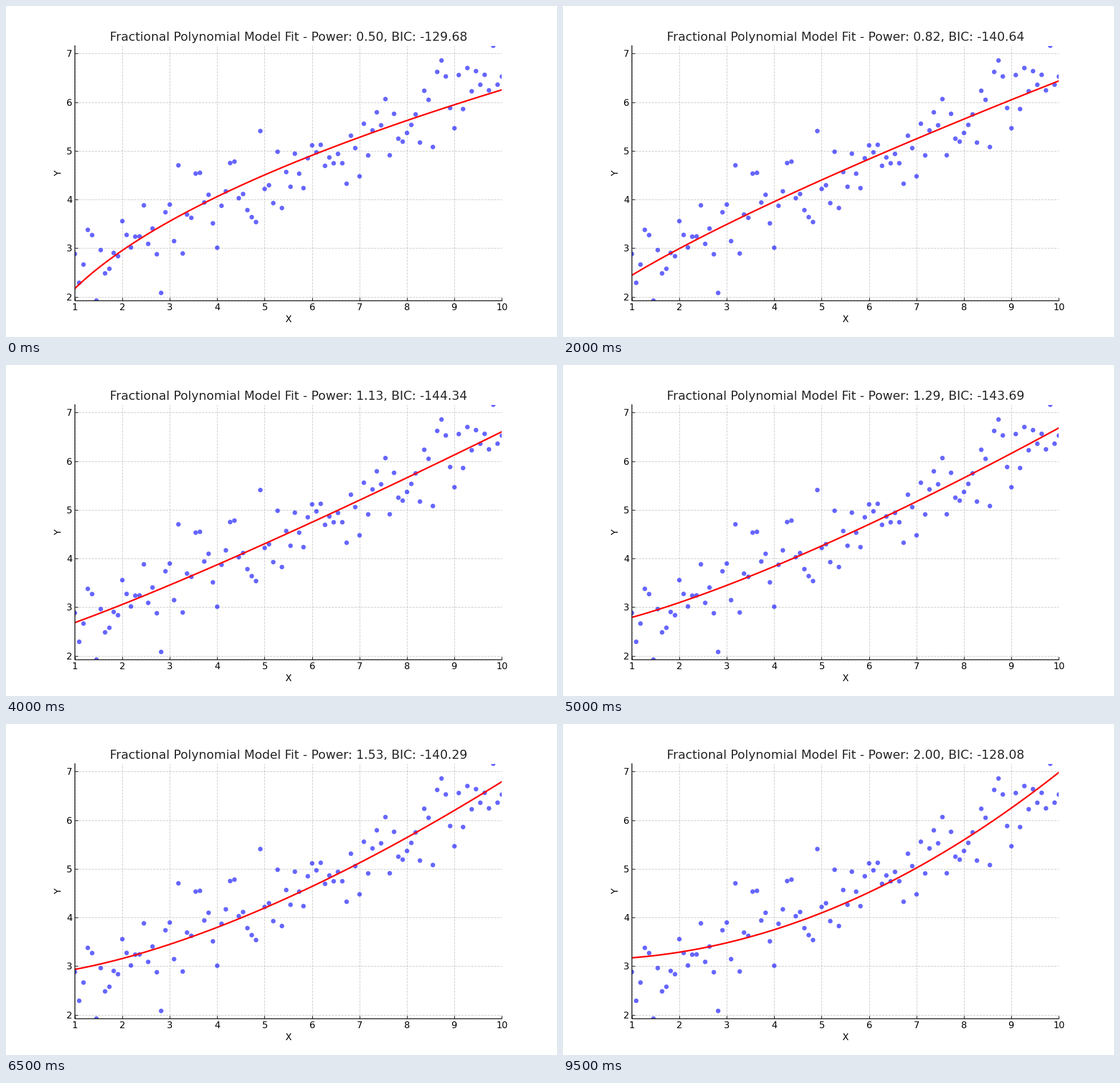
A matplotlib script for the animation above (10 s loop, 966 by 580 pixels).

```python
import matplotlib.pyplot as plt
import numpy as np
from matplotlib.animation import FuncAnimation

WIDTH, HEIGHT, DPI = 966, 580, 128
PT = 96.6 / DPI  # sizes below are in points of a 10 inch wide figure
FRAMES, INTERVAL = 20, 500

plt.rcParams.update({
    "font.family": "DejaVu Sans",
    "font.size": 12 * PT,
    "axes.linewidth": 1.0 * PT,
    "axes.spines.top": False,
    "axes.spines.right": False,
    "axes.axisbelow": True,
})

rng = np.random.RandomState(0)
x = np.linspace(1, 10, 100)
y = 2 * np.sqrt(x) + rng.normal(0, 0.5, x.size)
powers = np.linspace(0.5, 2, FRAMES)


def fit(power):
    """Least-squares fit of a + b * x**power, with its BIC."""
    design = np.column_stack([np.ones_like(x), x ** power])
    coef = np.linalg.lstsq(design, y, rcond=None)[0]
    fitted = design @ coef
    mse = np.mean((y - fitted) ** 2)
    bic = x.size * np.log(mse) + coef.size * np.log(x.size)
    return fitted, bic


fig, ax = plt.subplots(figsize=(WIDTH / DPI, HEIGHT / DPI), dpi=DPI,
                       facecolor="white")
fig.subplots_adjust(left=0.125, right=0.9, bottom=0.11, top=0.88)

# One colour per dot keeps the dots from being rounded to whole pixels.
ax.scatter(x, y, s=36 * PT ** 2, c=["blue"] * x.size, alpha=0.6, linewidths=0)
curve, = ax.plot([], [], color="red", linewidth=2 * PT)
title = ax.set_title("", fontsize=16 * PT, pad=6.6 * PT, color="#262626")

ax.set_xlim(x.min(), x.max())
ax.set_ylim(y.min(), y.max())
ax.set_xticks(range(1, 11))
ax.set_yticks(range(2, 8))
ax.set_xlabel("X", labelpad=4.8 * PT)
ax.set_ylabel("Y", labelpad=4 * PT)
ax.tick_params(direction="in", length=3.5 * PT, width=0.8 * PT, pad=3.5 * PT)
ax.grid(True, linestyle="--", color="#b0b0b0", alpha=0.65, linewidth=0.8 * PT)
ax.spines["left"].set_snap(False)


def update(frame):
    power = powers[frame]
    fitted, bic = fit(power)
    curve.set_data(x, fitted)
    title.set_text("Fractional Polynomial Model Fit - "
                   f"Power: {power:.2f}, BIC: {bic:.2f}")
    return curve, title


anim = FuncAnimation(fig, update, frames=FRAMES, interval=INTERVAL,
                     init_func=lambda: update(0), repeat=True, repeat_delay=0)
plt.show()
```
